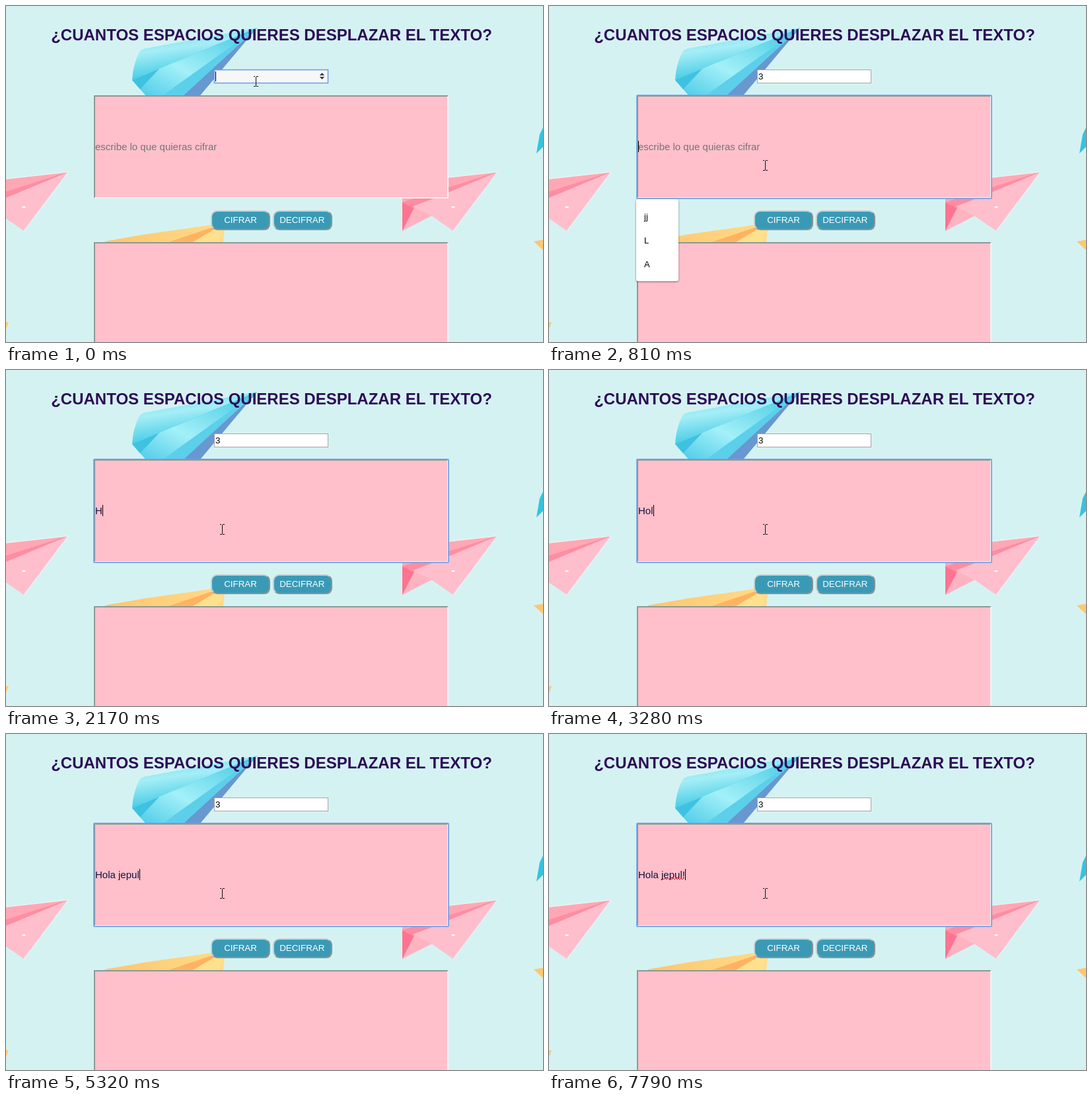
An HTML page that plays this animation: 813x508 px, repeating every 8000 ms.

```html
<!DOCTYPE html>
<html lang="es">
<head>
<meta charset="utf-8">
<title>Cifrado</title>
<style>
  html, body { margin: 0; width: 100%; height: 100%; overflow: hidden; background: #d5f2f2; }
  #stage { position: absolute; left: 0; top: 0; width: 813px; height: 508px; overflow: hidden; }
  svg { position: absolute; left: 0; top: 0; }
  svg, #line { font-family: "Liberation Sans", Arial, sans-serif; }
  .small { font-size: 13.333px; }
  #line { position: absolute; left: 135px; top: 204px; font-size: 15px; line-height: 17px; white-space: pre; color: #13113c; }
  #line.hint { color: #757575; }
  #caret { position: absolute; left: 100%; top: 0; width: 1px; height: 17px; background: #000; }
  .hint #caret { left: 0; }
</style>
</head>
<body>
<div id="stage">
  <svg width="813" height="508" viewBox="0 0 813 508">
    <defs>
      <linearGradient id="wing" x1="0" y1="0" x2=".35" y2="1">
        <stop offset="0" stop-color="#5fd6ea"/><stop offset=".45" stop-color="#a5eef6"/><stop offset="1" stop-color="#35c6e2"/>
      </linearGradient>
      <linearGradient id="belly" x1="0" y1="1" x2="1" y2="0">
        <stop offset="0" stop-color="#45c8e6"/><stop offset=".4" stop-color="#a3f0f8"/><stop offset="1" stop-color="#3dc6e2"/>
      </linearGradient>
      <linearGradient id="sun" x1="0" x2="1">
        <stop offset="0" stop-color="#ffc56c"/><stop offset="1" stop-color="#ffdc8a"/>
      </linearGradient>
      <g id="pinkPlane">
        <path fill="#ff7391" d="M-50 270L94 251 0 312-50 340Z"/>
        <path fill="#ffa8b5" d="M-50 267L94 251-50 297Z"/>
        <path fill="#ff8da2" d="M-50 297L94 251 0 305-20 312Z"/>
        <path fill="#ffb3c0" d="M-50 340L-31 303-5 317Z"/>
        <path fill="#ffbecb" d="M94 251L27 340-6 317-34 303 0 290Z"/>
        <path fill="none" stroke="#eefafa" d="M-50 267L94 251 27 340"/>
        <ellipse fill="#fff" cx="27" cy="304" rx="3" ry="1.3"/>
      </g>
      <g id="yellowPlane">
        <path fill="url(#sun)" d="M149 356L206 346 332 328 329 357 310 375 163 369Z"/>
        <path fill="#ffb361" d="M332 328L246 357H283Z"/>
        <path fill="#ffe08d" d="M332 328L283 357H323Z"/>
      </g>
    </defs>

    <rect width="813" height="508" fill="#d5f2f2"/>
    <g id="bluePlane">
      <path fill="#6798d0" d="M380 33L262 140H290Z"/>
      <path fill="url(#wing)" d="M380 33L212 64Q204 65 201 71 192 90 191 112L240 101Z"/>
      <path fill="#35c3e0" d="M380 33L194 111 216 120Z"/>
      <path fill="url(#belly)" d="M380 33L191 112 213 137H266Z"/>
      <path fill="#3fc2e2" d="M191 112L232 95 203 126Z"/>
      <path fill="#5ccfea" d="M380 33L235 137H267Z"/>
    </g>
    <path fill="#35c3e0" d="M813 184L808 194 803 223 813 213Z"/>
    <use href="#pinkPlane"/>
    <use href="#pinkPlane" x="650"/>
    <use href="#yellowPlane"/>
    <use href="#yellowPlane" x="650"/>
    <path fill="#ffcb75" d="M0 478H4L0 489Z"/>

    <text x="402" y="52" text-anchor="middle" font-size="24" font-weight="700" fill="#2c0b57">¿CUANTOS ESPACIOS QUIERES DESPLAZAR EL TEXTO?</text>

    <rect id="field" x="315.5" y="96.5" width="172" height="20"/>
    <g id="numberFocus">
      <path fill="#454545" stroke="#454545" stroke-linejoin="round" d="M475.5 104.5L478.5 101.5 481.5 104.5ZM475.5 107.5L478.5 110.5 481.5 107.5Z"/>
      <rect id="numberCaret" y="99" width="1" height="15"/>
    </g>
    <text id="digit" class="small" x="317" y="111">3</text>

    <g id="area">
      <path fill="#8d9896" d="M133 135H670L668 137H135V289L133 291Z"/>
      <path fill="#f3f3f3" d="M670 135V291H133L135 289H668V137Z"/>
      <rect fill="#ffc0cb" x="135" y="137" width="533" height="152"/>
    </g>
    <path fill="#8d9896" d="M133 357H670L668 359H135V508H133Z"/>
    <path fill="#f3f3f3" d="M670 357V508H668V359Z"/>
    <rect fill="#ffc0cb" x="135" y="359" width="533" height="149"/>
    <rect id="areaFocus" x="133" y="135" width="537" height="156" rx="1" fill="none" stroke="#6f9fe6" stroke-opacity=".85" stroke-width="2"/>

    <g class="small" text-anchor="middle" fill="#fff">
      <g id="button">
        <rect x="310" y="309" width="90" height="30" rx="10" fill="#c3cfcf"/>
        <path fill="#8d9293" d="M397 312Q400 315 400 319V329Q400 339 390 339H320Q316 339 313 336Z"/>
        <rect x="312" y="311" width="86" height="26" rx="8" fill="#3a9ab6"/>
      </g>
      <use href="#button" x="94"/>
      <text x="355" y="328">CIFRAR</text>
      <text x="448.3" y="328">DECIFRAR</text>
    </g>

    <g id="menu" font-size="13">
      <rect x="132" y="292" width="64" height="124" rx="3" fill="#fff" style="filter:drop-shadow(0 1px 1.5px #0007)"/>
      <text x="144" y="323">jj</text>
      <text x="144" y="359">L</text>
      <text x="144" y="395">A</text>
    </g>
    <path id="squiggle" fill="none" stroke="#e8112d"/>
  </svg>
  <div id="line"><span id="typed"></span><i id="caret"></i></div>
  <svg width="813" height="508">
    <path id="pointer" fill="none" stroke="#111" d="M-3 -7.5H-1M1 -7.5H4M.5 -7V7M-3 7.5H0M1 7.5H4"/>
  </svg>
</div>
<script>
  const LOOP = 8000;
  const HINT = 'escribe lo que quieras cifrar';
  const MESSAGE = 'Hola jepul!';
  const keyTimes = [2170, 3130, 3280, 3400, 3520, 4390, 4670, 4790, 5070, 5320, 7790];
  const caretToggles = [690, 1210, 1770, 2700, 3130, 4140, 4390, 5880, 6400, 6830, 7360];
  const pointerStops = [[0, 378, 114], [270, 377, 145], [420, 360, 185], [540, 330, 238], [690, 327, 241]];

  const el = id => document.getElementById(id);
  const show = (id, on) => { el(id).style.visibility = on ? 'visible' : 'hidden'; };
  const passed = (times, t) => times.filter(time => time <= t).length;

  el('squiggle').setAttribute('d', 'M170 220' + 'l2 -2l2 2'.repeat(8) + 'l2 -2');

  function draw(t) {
    const count = passed(keyTimes, t);
    const inArea = t >= 690;
    el('typed').textContent = count ? MESSAGE.slice(0, count) : HINT;
    el('line').className = count ? '' : 'hint';
    show('caret', passed(caretToggles, t) % 2 === 1);
    show('squiggle', t >= 6280);
    show('menu', t >= 810 && t < 2170);
    show('areaFocus', inArea);
    show('digit', t >= 150);
    show('numberFocus', !inArea);
    el('numberCaret').setAttribute('x', t < 150 ? 317 : 324);
    const field = el('field');
    field.setAttribute('fill', inArea ? '#fff' : '#f7f7f7');
    field.setAttribute('stroke', inArea ? '#a5a5a5' : '#6b9ae2');
    field.setAttribute('stroke-width', inArea ? 1 : 1.5);
    const [, x, y] = pointerStops.findLast(stop => stop[0] <= t);
    el('pointer').setAttribute('transform', `translate(${x} ${y})`);
  }

  const start = performance.now();
  function tick() {
    draw((performance.now() - start) % LOOP);
    requestAnimationFrame(tick);
  }
  tick();
</script>
</body>
</html>
```
